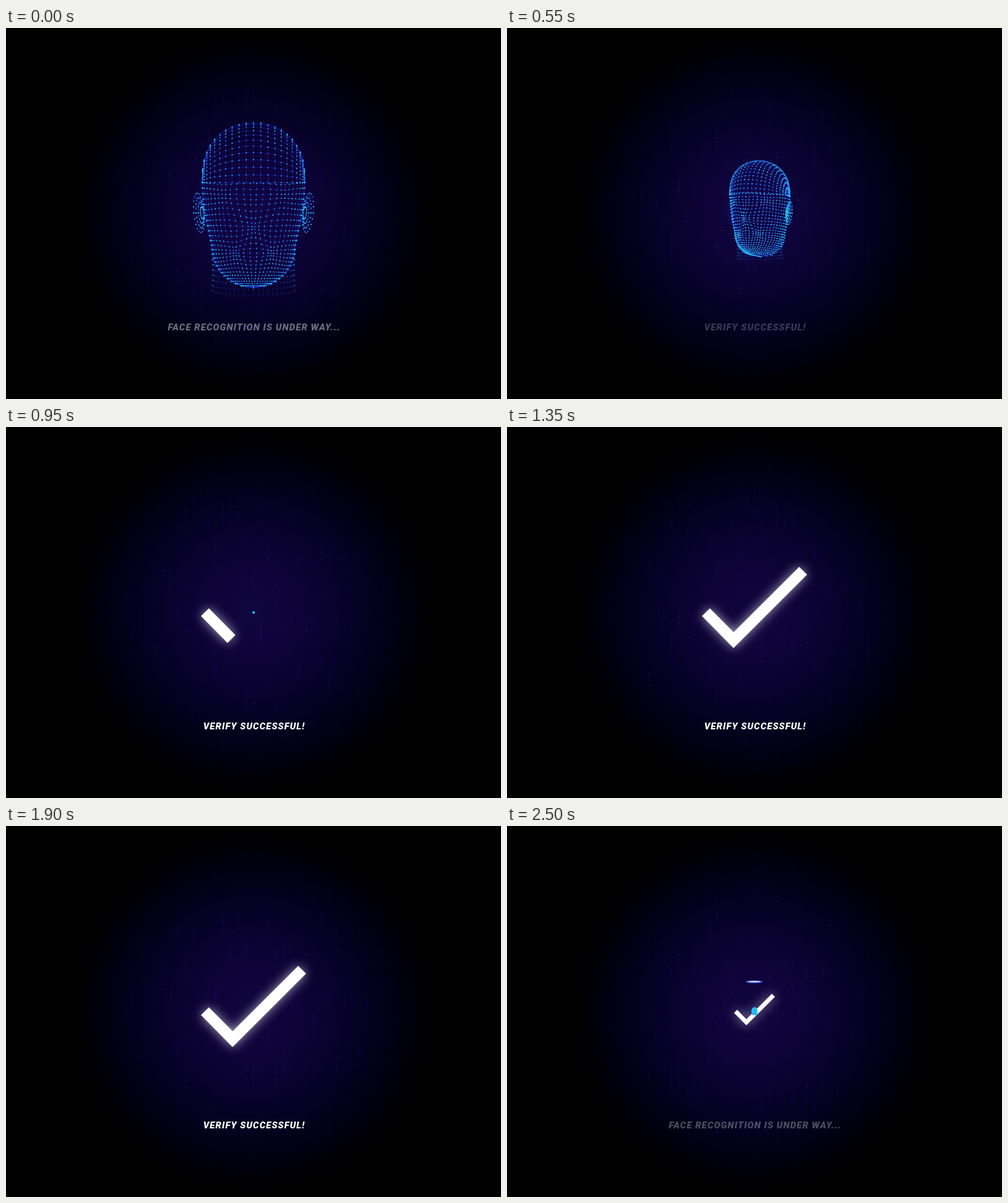
Animation of 800x600 px, one loop 2.55 s. Source, as an HTML page with a canvas:

```html
<!DOCTYPE html>
<html lang="en">
<head>
<meta charset="utf-8">
<title>Face recognition</title>
<style>
  html, body { margin: 0; width: 100%; height: 100%; overflow: hidden; background: #000; }
  canvas { display: block; }
</style>
</head>
<body>
<canvas id="stage" width="800" height="600"></canvas>
<script>
const ctx = document.getElementById('stage').getContext('2d');
const LOOP = 2550, STEP = 50, TAU = Math.PI * 2;

const clamp = v => Math.min(1, Math.max(0, v));
const ramp = (t, from, to) => clamp((t - from) / (to - from));
const ease = (t, from, to) => (1 - Math.cos(Math.PI * ramp(t, from, to))) / 2;
const hash = (a, b = 0) => {
  const v = Math.sin(a * 127.1 + b * 311.7) * 43758.5453;
  return v - Math.floor(v);
};

// ---- Head model: origin at the stage centre, z towards the viewer ----
const PIVOT = 40; // depth of the turning axis
const grid = (rows, cols, point) =>
  Array.from({ length: rows + 1 }, (_, r) =>
    Array.from({ length: cols + 1 }, (_, c) => point(r / rows, c / cols)));

const FEATURES = [ // x, y, radius, pull
  [0, 23, 26, .5], [-30, 63, 21, .55], [30, 63, 21, .55],
  [-50, -28, 26, .4], [50, -28, 26, .4], [0, -22, 20, .25]
];

function jawWidth(y) {
  const side = 83 - 16 * ramp(y, -40, 55) ** 1.4;
  return side * Math.sqrt(1 - ramp(y, 55, 120) ** 2);
}

function skull(v, u) {
  const a = (u - .5) * Math.PI, b = v * Math.PI;
  const c = Math.max(0, Math.cos(a));
  return { x: 83 * Math.sin(a), y: -50 - 97 * c ** .77 * Math.sin(b), z: 92 * c * Math.cos(b) };
}

function face(v, u) {
  const a = (u - .5) * 3.8;
  const y = -50 + 170 * Math.sin(v * 1.25) / Math.sin(1.25);
  const p = { x: jawWidth(y) * Math.sin(a), y, z: 92 * Math.cos(a) };
  const flat = Math.max(0, Math.cos(a));
  for (const [fx, fy, r, k] of FEATURES) {
    const dx = p.x - fx, dy = p.y - fy;
    const pull = k * flat * Math.exp(-(dx * dx + dy * dy) / (r * r));
    p.x -= dx * pull;
    p.y -= dy * pull;
  }
  if (p.z > 0) p.z += 22 * Math.exp(-(p.x ** 2 / 150 + (p.y - 18) ** 2 / 500));
  return p;
}

const ear = side => (v, u) => {
  const a = u * TAU, r = .3 + .7 * v;
  const y = 32 * r * Math.sin(a);
  return { x: side * (83 + 5 * v + 8.5 * r * Math.cos(a) - y * .09), y: y - 1, z: 6 - 6 * v };
};

function neck(v, u) {
  const a = (u - .5) * Math.PI, y = 58 + 66 * v + 8 * Math.cos(a) * v;
  const x = (68 - 2 * Math.sin(v * Math.PI)) * Math.sin(a);
  const hidden = y < 121 && Math.abs(x) < jawWidth(y);
  return { x, y, z: 40 * Math.cos(a), alpha: hidden ? 0 : .65 * (1 - v * .7) };
}

const HEAD = [
  grid(8, 26, neck), grid(24, 22, skull), grid(25, 31, face),
  grid(3, 20, ear(-1)), grid(3, 20, ear(1))
];

function drawHead(scale, yaw, pitch) {
  const sin = Math.sin(yaw), cos = Math.cos(yaw);
  const project = p => ({
    x: 400 + scale * (p.x * cos + (p.z - PIVOT) * sin),
    y: 300 + scale * (p.y - p.z * pitch),
    front: p.z * cos - p.x * sin > -8,
    alpha: p.alpha ?? 1
  });
  const line = (p, q) => {
    if (!q || !p.alpha || !q.alpha) return;
    ctx.globalAlpha = p.alpha * (p.front && q.front ? .34 : .14);
    ctx.beginPath();
    ctx.moveTo(p.x, p.y);
    ctx.lineTo(q.x, q.y);
    ctx.stroke();
  };
  const meshes = HEAD.map(mesh => mesh.map(row => row.map(project)));
  ctx.save();
  ctx.strokeStyle = '#2828f0';
  ctx.lineWidth = .9;
  for (const points of meshes) {
    points.forEach((row, r) => row.forEach((p, c) => {
      line(p, row[c + 1]);
      line(p, points[r + 1]?.[c]);
    }));
  }
  for (const points of meshes) {
    points.forEach((row, r) => row.forEach((p, c) => {
      if (!p.front) return;
      ctx.globalAlpha = p.alpha * (.65 + .35 * hash(r, c));
      ctx.fillStyle = hash(c, r) < .3 ? '#2a84ff' : '#2cd0ea';
      ctx.fillRect(p.x - .9, p.y - .9, 1.8, 1.8);
    }));
  }
  ctx.restore();
}

// ---- Backdrop ----
const glow = ctx.createRadialGradient(400, 300, 0, 400, 300, 290);
[[0, '#10063f'], [.24, '#0e043a'], [.45, '#09022e'], [.65, '#040120'], [.82, '#010010'], [1, '#000']]
  .forEach(([at, color]) => glow.addColorStop(at, color));

function drawBackdrop(t) {
  ctx.fillStyle = '#000';
  ctx.fillRect(0, 0, 800, 600);
  ctx.fillStyle = glow;
  ctx.fillRect(0, 0, 800, 600);
  ctx.fillStyle = '#2018a8';
  for (let c = -23; c <= 23; c++) {
    const turns = 1 + Math.floor(hash(c, 5) * 3), phase = hash(c, 9);
    for (let r = -46; r <= 46; r++) {
      const x = 400 + c * 12.2, y = 300 + r * 6.1;
      const fade = 1 - Math.hypot(x - 400, y - 300) / 288;
      if (fade <= 0) continue;
      const wave = Math.max(0, Math.sin(TAU * (r / 31 - turns * t / LOOP + phase)));
      const alpha = wave ** 3 * hash(r, c) ** 1.7 * Math.min(.8, fade * 1.6);
      if (alpha < .04) continue;
      ctx.globalAlpha = alpha;
      ctx.fillRect(x - 1, y - 1, 2, 2);
    }
  }
  ctx.globalAlpha = 1;
}

// ---- Check mark and caption ----
function drawCheck(progress, scale) {
  if (!progress) return;
  const shortArm = 63.3, longArm = 159;
  const length = progress * (shortArm + longArm);
  const first = Math.min(1, length / shortArm);
  const second = Math.max(0, (length - shortArm) / longArm);
  ctx.save();
  ctx.translate(400, 300);
  ctx.scale(scale, scale);
  ctx.beginPath();
  ctx.moveTo(-78.5, -.5);
  ctx.lineTo(-78.5 + 44.7 * first, -.5 + 45.2 * first);
  if (second) ctx.lineTo(-33.8 + 112.4 * second, 44.7 - 112.2 * second);
  ctx.strokeStyle = '#fff';
  ctx.lineWidth = 18;
  ctx.shadowColor = 'rgba(255,255,255,.65)';
  ctx.shadowBlur = 18;
  ctx.stroke();
  ctx.restore();
}

function drawCaption(text, alpha) {
  ctx.globalAlpha = alpha;
  ctx.fillStyle = '#fff';
  ctx.font = 'italic 900 15px Roboto, sans-serif';
  ctx.letterSpacing = '1.02px';
  ctx.textAlign = 'center';
  ctx.fillText(text, 401, 489);
  ctx.globalAlpha = 1;
}

function drawScanRing(t) {
  const size = ramp(t, 2400, 2500);
  if (!size) return;
  ctx.beginPath();
  ctx.ellipse(399.5, 252, 13.5 * size, 2 * size, 0, 0, TAU);
  ctx.fillStyle = '#4a62ff';
  ctx.fill();
  ctx.beginPath();
  ctx.ellipse(399.5, 251.5, 10 * size, size, 0, 0, TAU);
  ctx.fillStyle = '#dce6ff';
  ctx.fill();
}

function draw(t) {
  drawBackdrop(t);
  drawCheck(ease(t, 775, 1275), 1 - ease(t, 2100, 2800));

  const leaving = t < 1500;
  const headScale = leaving ? 1 - ease(t, 200, 980) : ease(t, 2400, 3200);
  const turn = leaving ? t / 550 : 0;
  if (headScale > 0) drawHead(headScale, -.38 * turn, .09 * turn);
  drawScanRing(t);

  drawCaption('FACE RECOGNITION IS UNDER WAY...',
    leaving ? .42 * (1 - ramp(t, 0, 220)) : ramp(t, 2350, 2850));
  drawCaption('VERIFY SUCCESSFUL!', ramp(t, 450, 900) * (1 - ramp(t, 1900, 2340)));
}

function tick() {
  const t = performance.now() % LOOP;
  draw(Math.floor(t / STEP) * STEP);
  requestAnimationFrame(tick);
}
tick();
</script>
</body>
</html>
```
